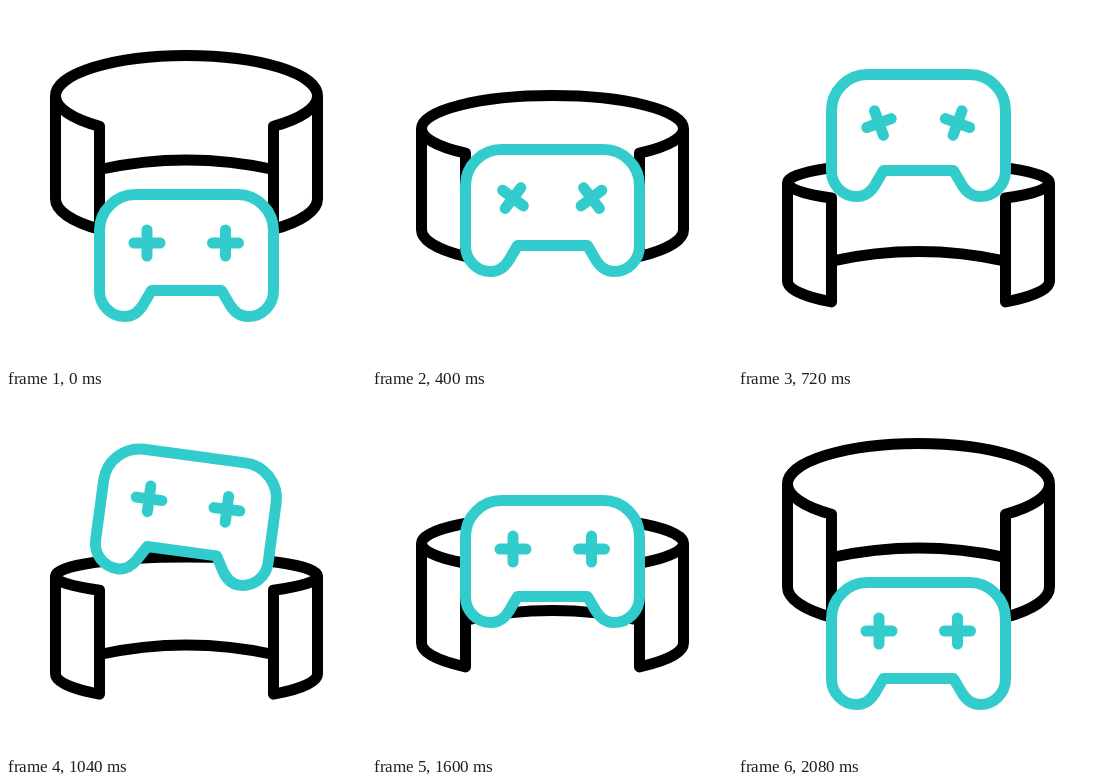
Animation, 360 px wide and 360 px high, one loop 2.12 s. Source, as an HTML page:

```html
<!DOCTYPE html>
<html lang="en">
<head>
<meta charset="utf-8">
<title>Headset and gamepad</title>
<style>
  html, body { margin: 0; width: 100%; height: 100%; overflow: hidden; background: #fff; }
  svg { display: block; width: 100vw; height: 100vh; }
  path { fill: none; stroke-width: 11; stroke-linecap: round; stroke-linejoin: round; }
  #headset { stroke: #000; }
  #pad path { stroke: #33cccc; }
  #pad .body { fill: #fff; }
</style>
</head>
<body>
<svg viewBox="0 0 360 360">
  <path id="headset"/>
  <g id="pad">
    <path class="body" d="M129.5 188.5H231.5A36 36 0 0 1 267.5 224.5V285A25.5 25.5 0 0 1 242 310.5C235 310.5 229 307 224 299L215.5 284.5H145.5L137 299C132 307 126 310.5 119 310.5A25.5 25.5 0 0 1 93.5 285V224.5A36 36 0 0 1 129.5 188.5Z"/>
    <path class="cross" data-x="141" data-spin="360" d="M-13 0H13M0-13V13"/>
    <path class="cross" data-x="219.5" data-spin="-360" d="M-13 0H13M0-13V13"/>
  </g>
</svg>
<script>
const LOOP = 2120, STEP = 40;
const CX = 180.5, RX = 131, INNER = 87;
const DROP = Math.sqrt(1 - (INNER / RX) ** 2);
const headset = document.getElementById('headset');
const pad = document.getElementById('pad');
const crosses = document.querySelectorAll('.cross');

const mix = (a, b, k) => a + (b - a) * k;

// cubic-bezier(.5, 0, .5, 1), solved by bisection
function ease(x) {
  if (x <= 0) return 0;
  if (x >= 1) return 1;
  let lo = 0, hi = 1, s = 0.5;
  for (let i = 0; i < 24; i++) {
    s = (lo + hi) / 2;
    if (1.5 * s * (1 - s) + s ** 3 < x) lo = s; else hi = s;
  }
  return s * s * (3 - 2 * s);
}

const ramp = (t, from, to) => ease((t - from) / (to - from));

function headsetPath(k) {
  const topY = mix(90, 182, k), topR = mix(40.5, 19, k);
  const lowY = mix(193, 280, k), lowR = mix(40.5, 27, k);
  const backY = mix(163.5, 260.5, k);
  const frontTop = topY + DROP * topR, frontLow = lowY + DROP * lowR;
  const left = CX - RX, right = CX + RX;
  const inL = CX - INNER, inR = CX + INNER;
  const panel = (outer, inner, sweep) =>
    `M${outer} ${topY}A${RX} ${topR} 0 0 ${sweep} ${inner} ${frontTop}` +
    `V${frontLow}A${RX} ${lowR} 0 0 ${1 - sweep} ${outer} ${lowY}Z`;
  return `M${left} ${topY}A${RX} ${topR} 0 0 1 ${right} ${topY}` +
    panel(left, inL, 0) + panel(right, inR, 1) +
    `M${inL} ${backY}Q${CX} ${backY - 19} ${inR} ${backY}`;
}

function draw(t) {
  const up = ramp(t, 50, 874);
  const k = up - ramp(t, 1285, 2025);
  const tilt = 8 * (ramp(t, 860, 1075) - ramp(t, 1075, 1270));
  headset.setAttribute('d', headsetPath(k));
  pad.setAttribute('transform', `translate(0 ${-127 * k}) rotate(${tilt} ${CX} 250)`);
  for (const { dataset, transform } of crosses) {
    const spin = dataset.spin * up;
    transform.baseVal.initialize(spinAt(dataset.x, spin));
  }
}

// Matrix transform placing a cross at x with the given rotation
function spinAt(x, angle) {
  const svg = pad.ownerSVGElement;
  const matrix = svg.createSVGMatrix().translate(+x, 237).rotate(angle);
  return svg.createSVGTransformFromMatrix(matrix);
}

const start = performance.now();
function tick() {
  const t = (performance.now() - start) % LOOP;
  draw(Math.floor(t / STEP) * STEP);
  requestAnimationFrame(tick);
}
tick();
</script>
</body>
</html>
```
